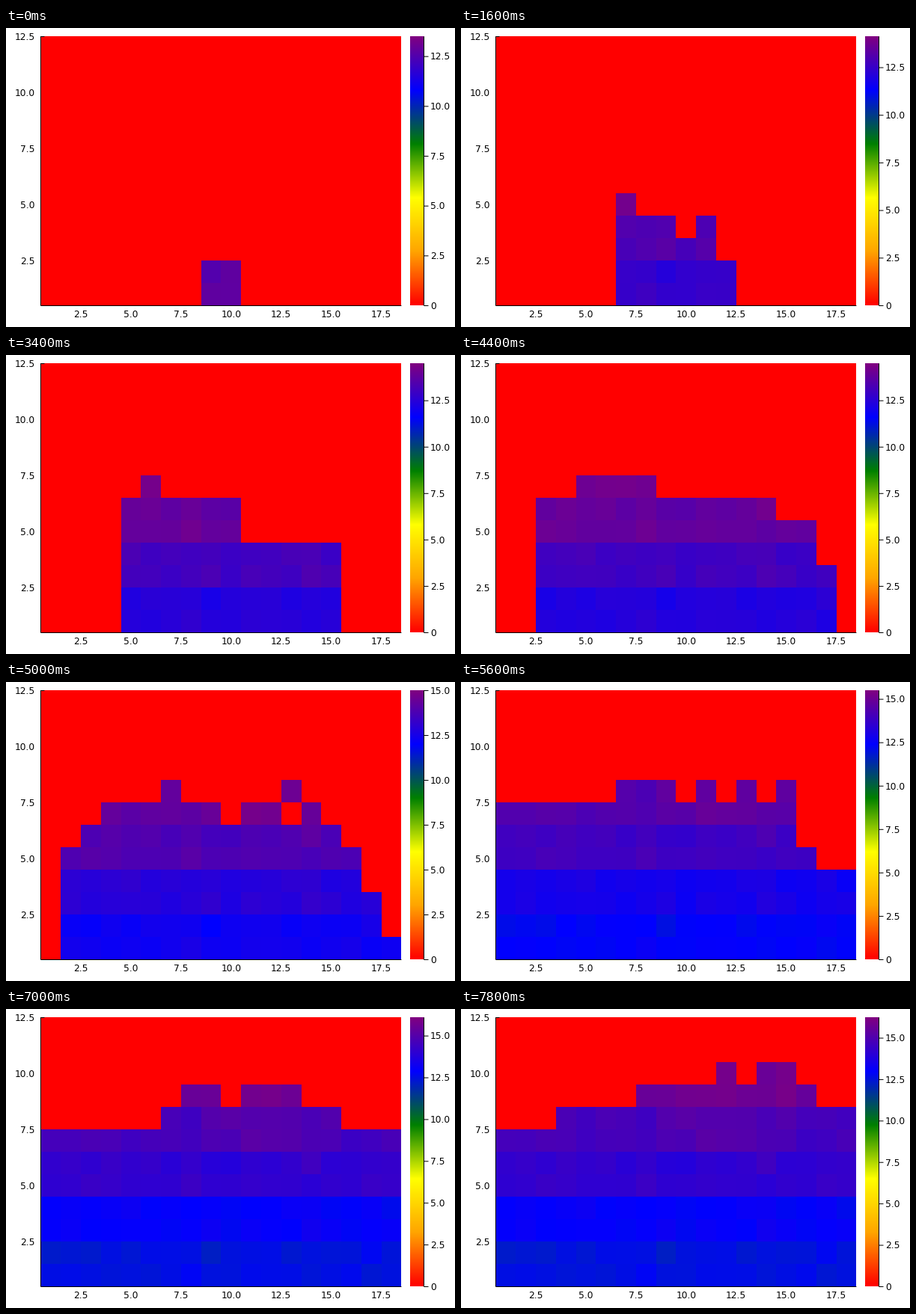
Recreate the animation shown at these times as a matplotlib script. Size 600 px wide and 400 px high, loop 8000 ms.

```python
import numpy as np
import matplotlib.pyplot as plt
from matplotlib.animation import FuncAnimation
from matplotlib.colors import LinearSegmentedColormap

W, H, DPI = 600, 400, 100
COLS, ROWS = 18, 12
STEP, FRAMES = 200, 40
LEFT, RIGHT, TOP, BOTTOM = 46.4, 528.4, 11.5, 371.5
CELL_W, CELL_H = (RIGHT - LEFT) / COLS, (BOTTOM - TOP) / ROWS
BAR_L, BAR_R = 540, 558.5
FONT = dict(family="DejaVu Sans", fontsize=8.8, color="black")

cmap = LinearSegmentedColormap.from_list(
    "heat", ["red", "orange", "yellow", "green", "blue", "purple"], N=1024)

# By each time the pile covers these blocks: (first column, last column, height).
PILE = {
    0: [(9, 10, 2)],
    1600: [(7, 7, 5), (8, 9, 4), (10, 10, 3), (11, 11, 4), (12, 12, 2)],
    3400: [(5, 15, 4), (5, 10, 6), (6, 6, 7)],
    4400: [(3, 17, 3), (3, 16, 5), (3, 14, 6), (5, 8, 7)],
    5600: [(1, 18, 4), (1, 16, 5), (1, 15, 7), (7, 9, 8)]
          + [(c, c, 8) for c in (11, 13, 15)],
    7000: [(1, 18, 7), (7, 15, 8), (8, 9, 9), (11, 13, 9)],
    7800: [(4, 18, 8), (8, 16, 9), (12, 12, 10), (14, 15, 10)],
}
# Scale maximum over time.
PEAK_T = [0, 1600, 3400, 4400, 5600, 7000, 7800]
PEAK_V = [13.5, 14.13, 14.5, 14.5, 15.5, 16.1, 16.24]
# Tone of each two-row layer, 0 blue to 1 purple, before and after cooling.
WARM = np.array([.27, .48, .76, .88, .88, .88])
COOL = np.array([-.11, .02, .38, .54, .8, .8])

rng = np.random.default_rng(7)
NOISE = rng.normal(0, .05, (ROWS, COLS))
row, col = np.mgrid[1:ROWS + 1, 1:COLS + 1]


def birth_times():
    """Cells near the existing pile fill first, with some jitter."""
    born = np.full((ROWS, COLS), np.inf)
    born[:2, 8:10] = 0
    last = 0
    for time, blocks in PILE.items():
        pile = np.argwhere(np.isfinite(born))
        for a, b, height in blocks:
            for r in range(height):
                for c in range(a - 1, b):
                    if np.isinf(born[r, c]):
                        gap = np.abs(pile - (r, c)).sum(axis=1).min()
                        u = min(.15 * gap + rng.uniform(.1, .6), 1)
                        born[r, c] = last + (time - last) * u
        last = time
    return born


BORN = birth_times()


def field(time):
    k = np.clip((time - 4400) / 2600, 0, 1)
    layer = WARM + (COOL - WARM) * (1 - (1 - k) ** 2)
    tone = layer[(row - 1) // 2] + .5 * np.exp(-time / 1300) + NOISE
    tone += np.where(row >= 7, .12 * np.exp(-((col - 12) / 3) ** 2), 0)
    return np.where(BORN <= time, .8 + .2 * np.minimum(tone, 1), 0)


fig = plt.figure(figsize=(W / DPI, H / DPI), dpi=DPI, facecolor="white")
ax = fig.add_axes([0, 0, 1, 1])
ax.axis("off")


def line(x, y):
    return ax.plot(x, y, color="black", lw=.72, solid_capstyle="butt",
                   snap=False)[0]


heat = ax.pcolormesh(np.round(LEFT + CELL_W * np.arange(COLS + 1)),
                     np.floor(BOTTOM - CELL_H * np.arange(ROWS + 1)),
                     field(0), cmap=cmap, vmin=0, vmax=1, antialiased=False)
ax.imshow(np.linspace(1, 0, 360)[:, None], cmap=cmap, vmin=0, vmax=1,
          extent=(BAR_L, 559, 371, 11), interpolation="nearest", aspect="auto")
ax.set(xlim=(0, W), ylim=(H, 0))

line([LEFT, LEFT], [TOP, BOTTOM])
line([LEFT, RIGHT], [BOTTOM, BOTTOM])
line([LEFT, LEFT + 5], [TOP, TOP])
line([BAR_R, BAR_R], [TOP, BOTTOM])

for n in range(1, 8):
    v = 2.5 * n
    ax.text(LEFT + (v - .5) * CELL_W, 383.8, f"{v:.1f}",
            ha="center", va="center", **FONT)
    if v <= 12.5:
        ax.text(38.5, BOTTOM - (v - .5) * CELL_H + .8, f"{v:.1f}",
                ha="right", va="center", **FONT)

ticks = []
for n in range(7):
    label = f"{2.5 * n:.1f}" if n else "0"
    ticks.append((2.5 * n, line([BAR_R, BAR_R + 6], [0, 0]),
                  ax.text(566.8, 0, label, ha="left", va="center", **FONT)))


def draw(frame):
    time = frame * STEP
    top = np.interp(time, PEAK_T, PEAK_V)
    heat.set_array(field(time))
    for v, mark, label in ticks:
        y = BOTTOM - v / top * (BOTTOM - TOP)
        mark.set_ydata([y, y])
        label.set_y(y + .8)
        mark.set_visible(v <= top)
        label.set_visible(v <= top)
    return [heat]


anim = FuncAnimation(fig, draw, frames=FRAMES, interval=STEP,
                     init_func=lambda: draw(0), repeat=True, repeat_delay=0)
plt.show()
```
